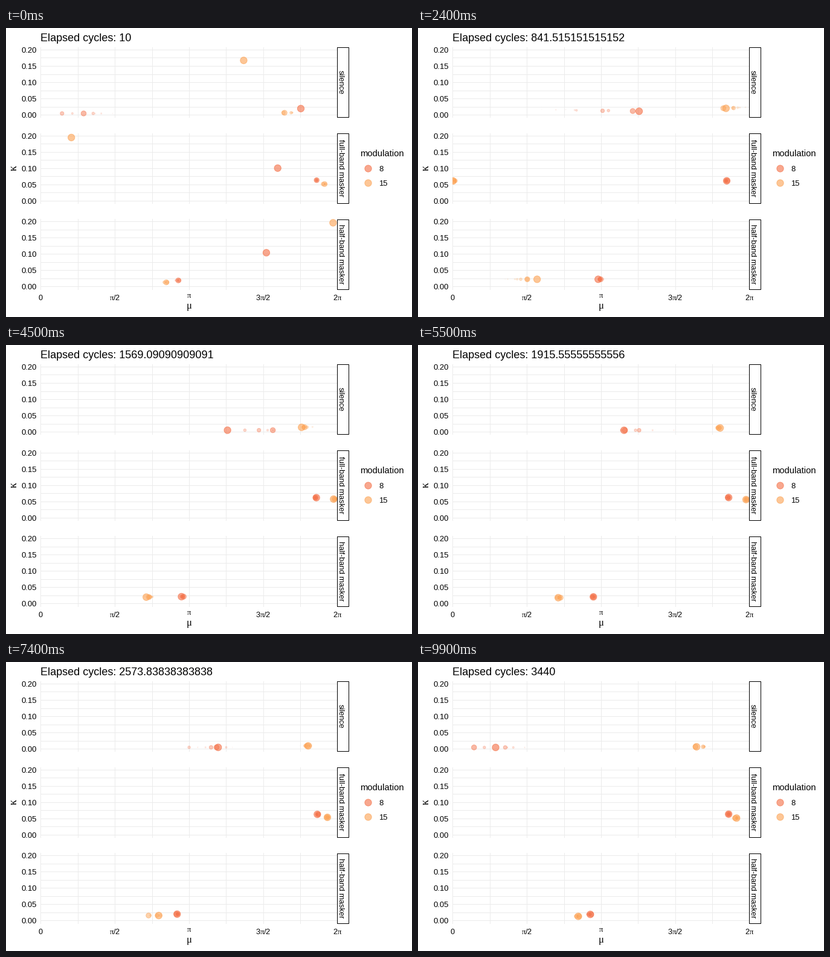
These frames come from a looping animation (672 by 480 pixels, 10 s). A matplotlib script:

```python
import numpy as np
import matplotlib
import matplotlib.pyplot as plt
from matplotlib.animation import FuncAnimation
from matplotlib.colors import to_rgba
from matplotlib.patches import Rectangle

matplotlib.rcParams.update({
    "font.family": "Liberation Sans",
    "mathtext.fontset": "custom",
    "mathtext.rm": "Liberation Sans",
    "mathtext.it": "Liberation Serif",
})

W, H, DPI = 672, 480, 96
FRAMES, INTERVAL = 100, 100
WAKE = 10
PX = 72 / DPI
LEFT, WIDTH = 57.4, 491
TOP, HEIGHT, STEP = 31.9, 116.4, 142.7
Y_MIN, Y_MAX = -0.0078, 0.2075
COLORS = {8: "#F46D43", 15: "#FCA050"}
ALPHA = 0.6
GRID = "#EBEBEB"

cycles = np.linspace(10, 3440, FRAMES)
pace = np.log(cycles)
rng = np.random.default_rng(7)

MU_STEPS = [0, 14, 35, 55, 74, 83, 99]
KAPPA_STEPS = [0, 14, 35, 99]


def track(mu, kappa, jitter):
    """Phase and strength settle with log(cycles); the phase jitters on its way."""
    noise = rng.normal(0, jitter, FRAMES)
    noise[MU_STEPS] = 0
    mu = np.interp(pace, pace[MU_STEPS], mu) + noise
    kappa = np.interp(pace, pace[KAPPA_STEPS], kappa)
    return np.column_stack([mu % (2 * np.pi), kappa])


# Each panel: modulation 8, then 15; phases are unwrapped
panels = {
    "silence": (
        track([5.51, 1.76, 5.41, 3.63, 3.76, 1.76, 0.91],
              [.019, .019, .005, .004], 0.3),
        track([4.30, 6.275, 5.64, 5.665, 5.665, 5.56, 5.165],
              [.167, .025, .016, .006], 0.1)),
    "full-band masker": (
        track([5.02, 5.805, 5.805, 5.845, 5.86, 5.845, 5.845],
              [.100, .061, .061, .063], 0.01),
        track([0.65, 0.09, -0.03, -0.07, -0.21, -0.25, -0.27],
              [.194, .063, .059, .051], 0.02)),
    "half-band masker": (
        track([4.78, 3.23, 3.02, 2.98, 2.89, 2.875, 2.915],
              [.104, .023, .022, .019], 0.02),
        track([-0.09, 0.78, 2.415, 2.235, 2.50, 2.48, 2.66],
              [.196, .023, .022, .013], 0.08)),
}

fig = plt.figure(figsize=(W / DPI, H / DPI), dpi=DPI, facecolor="white")
stage = fig.add_axes([0, 0, 1, 1], zorder=2)
stage.set(xlim=(0, W), ylim=(H, 0))
stage.axis("off")


def label(x, y, text, size, **kw):
    kw = {"va": "baseline", **kw}
    return stage.text(x, y, text, fontsize=size * PX, color="black", **kw)


def dots(ax, xy, scale, colors):
    size = ((10.4 * np.asarray(scale) + 0.9) * PX) ** 2
    xy = np.asarray(xy)
    return ax.scatter(xy[:, 0], xy[:, 1], s=size, facecolors=colors,
                      edgecolors=colors, linewidths=PX, zorder=3)


# Oldest dots first so the current ones lie on top
lags = np.arange(WAKE - 1, -1, -1)
fade = (1 - lags / WAKE) ** 3
wake_scale = np.repeat(fade, 2)
wake_colors = [to_rgba(c, ALPHA * f ** 0.75)
               for f in fade for c in COLORS.values()]


def wake(pair, i):
    past = (i - lags) % FRAMES
    return np.stack([t[past] for t in pair], axis=1).reshape(-1, 2)


def add_panel(top, name, pair):
    ax = fig.add_axes([LEFT / W, 1 - (top + HEIGHT) / H, WIDTH / W, HEIGHT / H],
                      zorder=1)
    ax.set(xlim=(0, 2 * np.pi), ylim=(Y_MIN, Y_MAX))
    ax.axis("off")
    line = dict(color=GRID, lw=PX, zorder=1, clip_on=False)
    for x in np.linspace(0, 2 * np.pi, 9):
        ax.axvline(x, **line)
    for y in np.arange(9) * 0.025:
        ax.axhline(y, **line)

    for y in np.arange(5) * 0.05:
        py = top + HEIGHT * (Y_MAX - y) / (Y_MAX - Y_MIN)
        label(51, py + 5, f"{y:.2f}", 13.1, ha="right")

    stage.add_patch(Rectangle((548, top + 0.3), 19, 116, fc="white",
                              ec="black", lw=PX))
    label(550.6, top + 58, name, 12.9, rotation=-90, ha="center",
          rotation_mode="anchor")
    return dots(ax, wake(pair, 0), wake_scale, wake_colors)


clouds = [add_panel(TOP + STEP * k, name, pair)
          for k, (name, pair) in enumerate(panels.items())]

ticks = ["0", r"$\pi\mathrm{/2}$", r"$\pi$", r"$\mathrm{3}\pi\mathrm{/2}$",
         r"$\mathrm{2}\pi$"]
for k, text in enumerate(ticks):
    base = 448 if text == r"$\pi$" else 451.7
    label(LEFT + WIDTH * k / 4, base, text, 12.6, ha="center")
label(303, 466.5, r"$\mu$", 16.5, ha="center")
label(13.5, 233, r"$\kappa$", 18, ha="center", va="center", rotation=90)

label(586.2, 213, "modulation", 14.7)
for y, (mod, color) in zip((233.3, 257), COLORS.items()):
    dots(stage, [(599.1, y)], [1], [to_rgba(color, ALPHA)])
    label(617.5, y + 5, str(mod), 13)

title = label(57.2, 22, "", 18)


def update(i):
    title.set_text(f"Elapsed cycles: {cycles[i]:.15g}")
    for cloud, pair in zip(clouds, panels.values()):
        cloud.set_offsets(wake(pair, i))
    return [title, *clouds]


anim = FuncAnimation(fig, update, frames=FRAMES, interval=INTERVAL,
                     repeat=True, repeat_delay=0, blit=False)
plt.show()
```
